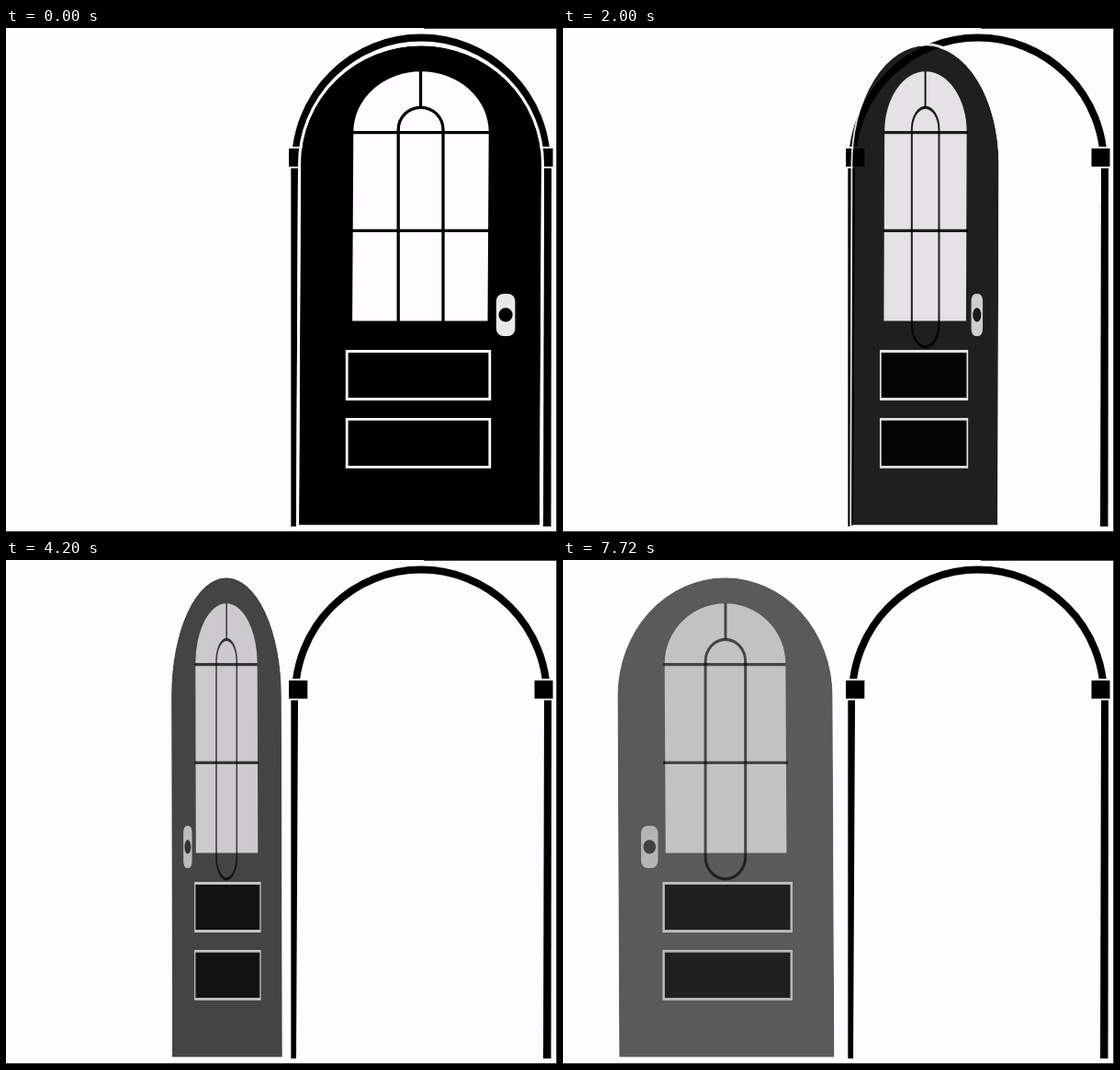
Animation, 600 px wide and 548 px high, one loop 7.84 s. Source, as an HTML page with a canvas:

```html
<!DOCTYPE html>
<html lang="en">
<head>
<meta charset="utf-8">
<title>Opening door</title>
<style>
html, body { margin: 0; width: 100%; height: 100%; overflow: hidden; background: #fdfcff; }
canvas { display: block; width: 600px; height: 548px; }
</style>
</head>
<body>
<canvas id="stage"></canvas>
<script>
const W = 600, H = 548;
const LOOP = 7840, SWING = 5640, RAMP = 420;
const HINGE = 306.5, MAX_ANGLE = 153.3 * Math.PI / 180, FADE = 0.355;
const BLACK = '#000', WHITE = '#fffdff', PAPER = '#fdfcff', PLATE = '#e9e8e9', EDGE = '#444';

const canvas = document.getElementById('stage');
const ctx = canvas.getContext('2d');
const ratio = window.devicePixelRatio || 1;
canvas.width = W * ratio;
canvas.height = H * ratio;

// Constant speed with a short soft start and stop; returns 0..1.
function swing(t) {
  if (t >= SWING) return 1;
  const span = SWING - RAMP;
  if (t < RAMP) return t * t / (2 * RAMP * span);
  const left = SWING - t;
  if (left < RAMP) return 1 - left * left / (2 * RAMP * span);
  return (t - RAMP / 2) / span;
}

function fill(color, path) {
  ctx.beginPath();
  path();
  ctx.fillStyle = color;
  ctx.fill();
}

function stroke(color, width, path) {
  ctx.beginPath();
  path();
  ctx.strokeStyle = color;
  ctx.lineWidth = width;
  ctx.stroke();
}

function poly(...p) {
  ctx.moveTo(p[0], p[1]);
  for (let i = 2; i < p.length; i += 2) ctx.lineTo(p[i], p[i + 1]);
}

// Arched outline whose foot is shifted sideways by lean.
function arch(cx, cy, rx, ry, foot, lean) {
  ctx.moveTo(cx - rx + lean, foot);
  ctx.lineTo(cx - rx, cy);
  ctx.ellipse(cx, cy, rx, ry, 0, Math.PI, 2 * Math.PI);
  ctx.lineTo(cx + rx + lean, foot);
  ctx.closePath();
}

function drawFrame() {
  ctx.fillStyle = PAPER;
  ctx.fillRect(0, 0, W, H);

  ctx.fillStyle = EDGE;
  ctx.fillRect(0, 547, W, 1);
  ctx.fillRect(599, 0, 1, H);
  ctx.fillRect(455, 0, 145, 1);

  ctx.save();
  ctx.beginPath();
  ctx.rect(0, 0, W, 129);
  ctx.clip();
  stroke(BLACK, 8, () => ctx.arc(451.9, 147.6, 137, Math.PI, 2 * Math.PI));
  ctx.restore();

  ctx.fillStyle = BLACK;
  ctx.fillRect(308, 131, 20.3, 19.7);
  ctx.fillRect(575.5, 131, 20, 19.7);
  fill(BLACK, () => poly(310.3, 152.5, 318, 152.5, 316, 542, 310.3, 542));
  fill(BLACK, () => poly(586, 152.5, 594, 152.5, 593.5, 542, 585, 542));
}

function drawPanel(y) {
  const box = () => ctx.rect(371.2, y, 155.6, 52);
  fill(BLACK, box);
  stroke(WHITE, 2.8, box);
}

function drawDoor() {
  fill(BLACK, () => arch(452, 147.5, 131, 128.3, 540.5, -2));
  stroke(WHITE, 3, () => arch(452, 147.5, 132.5, 129.8, 542, -2));

  fill(WHITE, () => arch(452, 113, 73.7, 65.7, 318.5, -1.2));
  stroke(BLACK, 3.3, () => poly(451.5, 47, 451.5, 86));
  stroke(BLACK, 3.3, () => poly(378, 113.7, 527.5, 113.7));
  stroke(BLACK, 3.3, () => poly(375.5, 220.3, 527.7, 220.3));
  stroke(BLACK, 3.3, () => ctx.roundRect(427.2, 86.3, 48.8, 260.5, 24.4));

  drawPanel(351.5);
  drawPanel(425.3);

  fill(PLATE, () => ctx.roundRect(533.8, 289, 20.6, 46, 8));
  fill(BLACK, () => ctx.arc(544.1, 311.8, 7.6, 0, 2 * Math.PI));
}

function render(t) {
  const p = swing(t);
  const s = Math.cos(p * MAX_ANGLE);
  ctx.globalAlpha = 1;
  ctx.setTransform(ratio, 0, 0, ratio, 0, 0);
  drawFrame();
  ctx.globalAlpha = 1 - FADE * p;
  ctx.setTransform(ratio * s, 0, 0, ratio, ratio * HINGE * (1 - s), 0);
  drawDoor();
}

const start = performance.now();
function tick() {
  render((performance.now() - start) % LOOP);
  requestAnimationFrame(tick);
}
tick();
</script>
</body>
</html>
```
